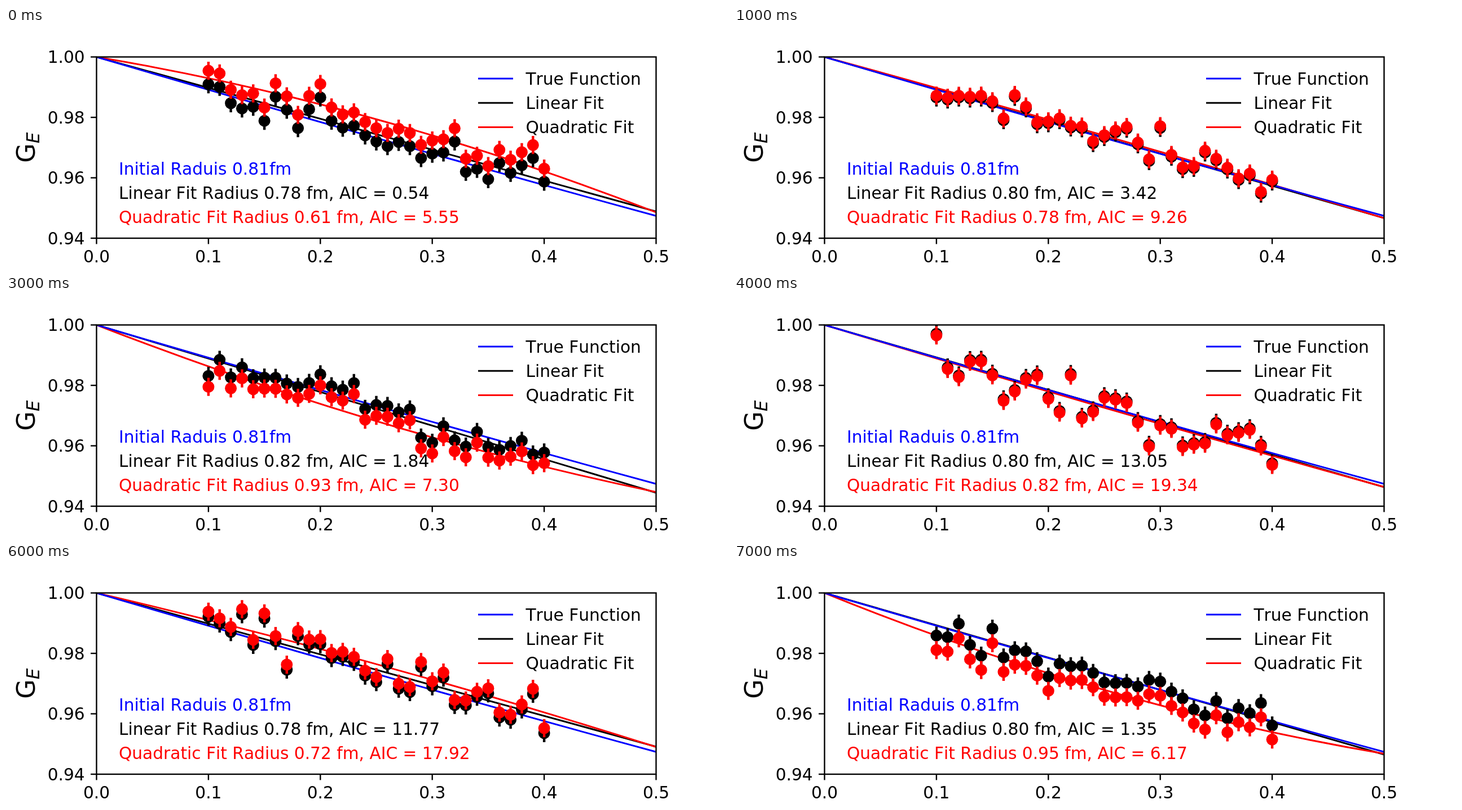
An HTML page that plays this animation: 1280x427 px, repeating every 8000 ms.

```html
<!DOCTYPE html>
<html lang="en">
<head>
<meta charset="utf-8">
<title>Radius fits</title>
<style>
  html, body { margin: 0; width: 100%; height: 100%; overflow: hidden; background: #fff; }
  svg { display: block; font: 29.65px "DejaVu Sans", sans-serif; font-kerning: none; }
  .frame { fill: none; stroke: #000; stroke-width: 2.4; }
  .curve { fill: none; stroke-width: 3; }
</style>
</head>
<body>
<svg width="1280" height="427" viewBox="0 0 1280 427">
  <clipPath id="area"><rect x="160.5" y="51.5" width="992" height="322.5"/></clipPath>
  <g id="plot" clip-path="url(#area)"></g>
  <g id="axes"></g>
  <g id="notes"></g>
  <g transform="translate(51 239.8) rotate(-90)">
    <text font-size="44.5">G</text>
    <text x="34.5" y="8" font-size="31.1" font-style="italic">E</text>
  </g>
</svg>
<script>
const LEFT = 160.5, TOP = 51.5, WIDTH = 992, HEIGHT = 322.5;
const RIGHT = LEFT + WIDTH, BOTTOM = TOP + HEIGHT;
const UNIT = HEIGHT / 0.06;     // pixels per unit of G
const SIGMA = 0.003 * UNIT;     // error bar
const POINTS = 31, TRUE_RADIUS = 0.81;

// Radius and AIC of the linear and of the quadratic fit, one row per second
const trials = [
  [0.7835, 0.54, 0.61, 5.55],
  [0.8, 3.42, 0.78, 9.26],
  [0.7523, 1.75, 0.1, 0.79],
  [0.8163, 1.84, 0.93, 7.3],
  [0.8025, 13.05, 0.82, 19.34],
  [0.8, 4.61, 0.81, 10.87],
  [0.7814, 11.77, 0.72, 17.92],
  [0.8012, 1.35, 0.95, 6.17],
];

const $ = id => document.getElementById(id);
const xAt = q => LEFT + q / 0.5 * WIDTH;
const drop = (radius, q) => radius ** 2 / 6 * q * UNIT;   // pixels below G = 1

const label = (x, y, text, color = 'black', anchor = 'start') =>
  `<text x="${x}" y="${y}" fill="${color}" text-anchor="${anchor}">${text}</text>`;
const path = (d, color) => `<path class="curve" d="${d}" stroke="${color}"/>`;

// A parabola from G(0) = 1 whose initial slope follows from the radius
const parabola = (radius, end, color) =>
  path(`M${LEFT} ${TOP}Q${xAt(0.25)} ${TOP + drop(radius, 0.25)} ${RIGHT} ${end}`, color);

const points = (ys, color) => ys.map((y, i) => {
  const x = xAt(0.1 + i / 100);
  return `<path d="M${x} ${y - SIGMA}v${2 * SIGMA}" stroke="${color}" stroke-width="4.4"/>` +
    `<circle cx="${x}" cy="${y}" r="10.5" fill="${color}"/>`;
}).join('');

// Normal scatter around the linear fit; a larger AIC means a larger spread
function scatter(radius, aic, seed) {
  const random = () => (seed = seed * 16807 % 2147483647) / 2147483647;
  const spread = SIGMA * Math.exp((aic - 2) / (2 * POINTS));
  return Array.from({ length: POINTS }, (_, i) => {
    const normal = (random() + random() + random() + random() - 2) * Math.sqrt(3);
    return TOP + drop(radius, 0.1 + i / 100) + normal * spread;
  });
}

function drawAxes() {
  let out = `<rect class="frame" x="${LEFT}" y="${TOP}" width="${WIDTH}" height="${HEIGHT}"/>`;
  for (let i = 0; i < 6; i++) {
    const x = xAt(i / 10);
    out += `<path class="frame" d="M${x} ${BOTTOM}v10.4"/>` +
      label(x, 416.6, (i / 10).toFixed(1), 'black', 'middle');
  }
  for (let i = 0; i < 4; i++) {
    const y = TOP + i * HEIGHT / 3;
    out += `<path class="frame" d="M${LEFT} ${y}h-10.4"/>` +
      label(LEFT - 20.8, y + 10.8, (1 - i / 50).toFixed(2), 'black', 'end');
  }
  [['True Function', 'blue'], ['Linear Fit', 'black'], ['Quadratic Fit', 'red']].forEach(([name, color], i) => {
    out += path(`M837 ${90 + i * 43.2}h62`, color) + label(921.4, 100.7 + i * 43.1, name);
  });
  $('axes').innerHTML = out;
}

function drawTrial(index) {
  const [linear, linearAic, quadratic, quadraticAic] = trials[index];
  const gap = linear ** 2 - quadratic ** 2;
  const end = TOP + drop(linear, 0.5);
  const ys = scatter(linear, linearAic, 7919 * (index + 3) ** 3);
  // The quadratic fit renormalises the data in proportion to the gap
  const shifted = ys.map(y => y - 100 * gap * (1 - (y - TOP) / UNIT));
  $('plot').innerHTML =
    path(`M${LEFT} ${TOP}L${RIGHT} ${end}`, 'black') +
    parabola(quadratic, end + 6 * gap, 'red') +
    parabola(TRUE_RADIUS, 334.3, 'blue') +
    points(ys, 'black') + points(shifted, 'red');

  const summary = (name, radius, aic) =>
    `${name} Fit Radius ${radius.toFixed(2)} fm, AIC = ${aic.toFixed(2)}`;
  $('notes').innerHTML =
    label(200, 261.4, `Initial Raduis ${TRUE_RADIUS}fm`, 'blue') +
    label(200, 304.4, summary('Linear', linear, linearAic)) +
    label(200, 347.2, summary('Quadratic', quadratic, quadraticAic), 'red');
}

let shown = -1;
function tick() {
  const index = Math.floor(performance.now() / 1000) % trials.length;
  if (index !== shown) drawTrial(shown = index);
  requestAnimationFrame(tick);
}
drawAxes();
tick();
</script>
</body>
</html>
```
